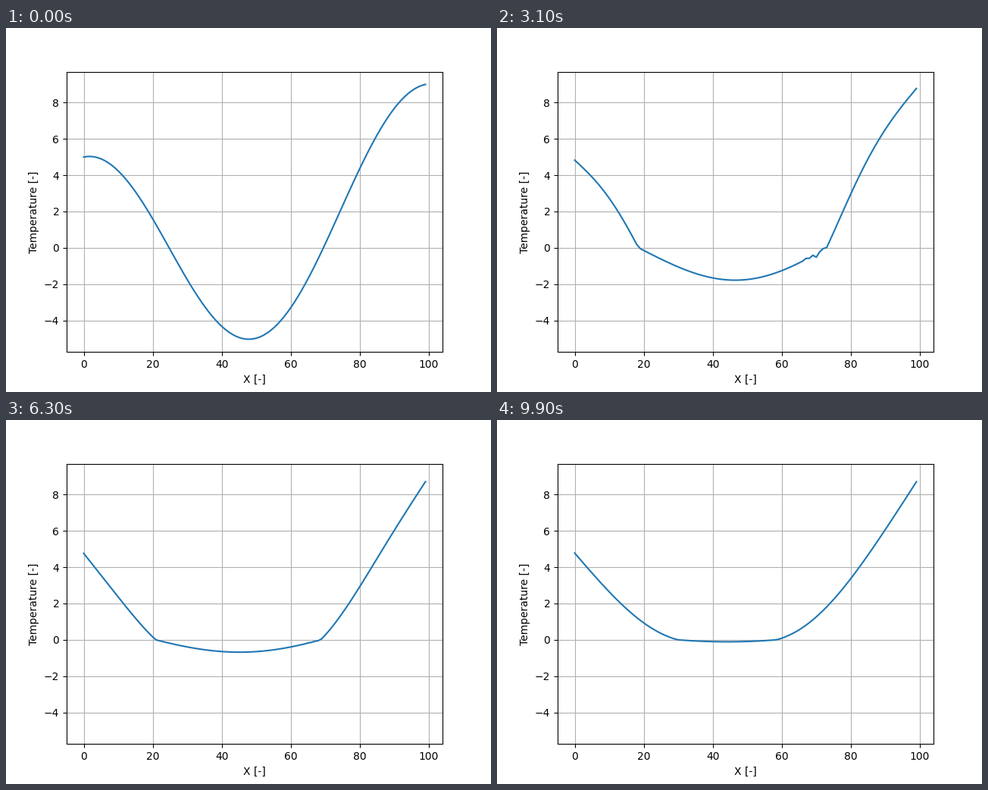
Recreate the animation shown at these times as a matplotlib script. Size 640 by 480 pixels, loop 10000 ms.

```python
"""Heat conduction through a rod whose frozen middle thaws between two warm ends."""
import numpy as np
import matplotlib.pyplot as plt
from matplotlib.animation import FuncAnimation

FRAMES, INTERVAL = 100, 100
SUBSTEPS = 40
K_WATER, K_ICE = 2.34, 8.58     # conductivity, cells squared per frame
T_LEFT, T_RIGHT = 5, 9          # fixed temperatures just outside the rod

x = np.arange(100)
start = 6 * np.cos(2 * np.pi * x / 99) - 1 + 4 * x / 99


def advance(u):
    """Conduct heat for one frame with explicit steps."""
    for _ in range(SUBSTEPS):
        full = np.concatenate(([T_LEFT], u, [T_RIGHT]))
        heat = K_WATER * np.maximum(full, 0) + K_ICE * np.minimum(full, 0)
        u = u + np.diff(heat, 2) / SUBSTEPS
    return u


def ripple(t, u):
    """Jagged numerical noise on the icy side of both fronts, dying out in time."""
    out = np.zeros(len(u))
    cold = np.flatnonzero(u < 0)
    if t == 0 or len(cold) < 12:
        return out
    rng = np.random.default_rng(t)
    k = np.arange(6)
    fade = (-.65) ** k
    for cells, size, life in ((cold[0] + k, .25, 20), (cold[-1] - k, -.5, 45)):
        out[cells] = size * fade * rng.uniform(-.2, 1, 6) / (1 + (t / life) ** 8)
    return out


states = [start]
while len(states) < FRAMES:
    states.append(advance(states[-1]))

fig, ax = plt.subplots(figsize=(6.4, 4.8), dpi=100)
line, = ax.plot(x, start)
ax.set_xlabel("X [-]")
ax.set_ylabel("Temperature [-]")
ax.grid()


def update(t):
    line.set_ydata(states[t] + ripple(t, states[t]))
    return line,


anim = FuncAnimation(fig, update, frames=FRAMES, interval=INTERVAL, repeat=True, repeat_delay=0)
plt.show()
```
